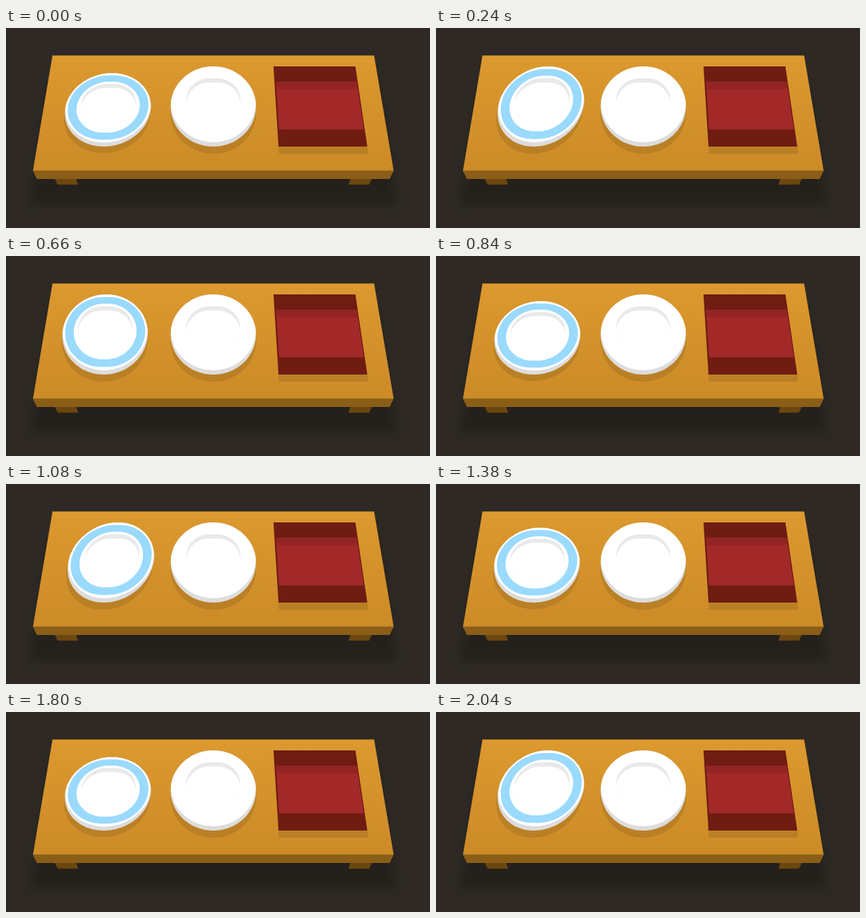
These frames come from a looping animation (640x302 px, 2.1 s). An HTML page with a canvas:

```html
<!DOCTYPE html>
<html lang="en">
<head>
<meta charset="utf-8">
<title>Swaying plate</title>
<style>
  html, body { margin: 0; width: 100%; height: 100%; overflow: hidden; background: #2e2924; }
  canvas { display: block; width: 640px; height: 302px; }
</style>
</head>
<body>
<canvas id="stage" width="640" height="302"></canvas>
<script>
const ctx = document.getElementById('stage').getContext('2d');

const STEP = 60, STEPS = 35, CYCLE = 15;
const CENTER = { x: 312.9, y: 118 }, DEPTH = 1507, TILT = 0.94;
const TABLE = { half: 255.7, back: -85.7, front: 97.4 };
const BASE = 62.4;      // front edge of the dishes on the table plane
const GAP = 159;        // distance between dishes
const RADIUS = 64.4;
const DROP = 10.5;      // shadow length
const SHADE = 'rgba(0,0,0,0.1)';
const STILL = { lean: 0, height: 1 };

// Lean left and right, flattening whenever the plate passes upright.
function swayAt(step) {
  const swing = Math.sin(2 * Math.PI * (step + 0.5) / CYCLE);
  const reach = Math.min(1, 1.25 * Math.abs(swing) ** 1.6);
  return { lean: 0.07 * Math.sign(swing) * reach, height: 0.9 + 0.1 * reach };
}

// table plane to screen
function project(u, v) {
  const w = v * TILT;
  const s = 1 / (1 - w / DEPTH);
  return [CENTER.x + u * s, CENTER.y + w * s];
}

function polygon(points) {
  const path = new Path2D();
  points.forEach(([x, y]) => path.lineTo(x, y));
  path.closePath();
  return path;
}

function box(left, right, back, front) {
  return polygon([
    project(left, back), project(right, back), project(right, front), project(left, front)
  ]);
}

// Circle of radius r, widened by a straight part of half length flat.
function disc(x, v, r, pose, flat = 0) {
  const points = [];
  for (let i = 0; i < 120; i++) {
    const a = (i + 0.5) * Math.PI / 60;
    const side = r * Math.cos(a) + flat * Math.sign(Math.cos(a));
    const rise = (BASE - v - r * Math.sin(a)) * pose.height;
    points.push(project(x + side + rise * pose.lean, BASE - rise));
  }
  return polygon(points);
}

function fill(color, path) {
  ctx.fillStyle = color;
  ctx.fill(path);
}

function clipped(color, path, mask) {
  ctx.save();
  ctx.clip(mask);
  fill(color, path);
  ctx.restore();
}

function plate(x, pose, ring) {
  const v = BASE - RADIUS;
  const body = disc(x, v, RADIUS, pose);
  fill(SHADE, disc(x, v + DROP, RADIUS, pose));
  fill('#dcdcdc', body);
  clipped('#fff', disc(x, v - 6.5, RADIUS, pose), body);
  if (ring) {
    fill('#9adafd', disc(x, -5.5, 56.5, pose, 4));
    fill('#fff', disc(x, -5.5, 45, pose, 2.5));
  }
  const well = disc(x, -11, 35, pose, 6);
  fill('#e9e9e9', well);
  clipped('#fff', disc(x, -4, 35, pose, 6), well);
}

function leg(mirror) {
  const corner = (dx, y) => [CENTER.x + mirror * dx, y];
  fill('#6c470f', polygon([corner(239, 228), corner(207, 228), corner(204, 236.6), corner(235, 236.6)]));
}

function table() {
  const { half, back, front } = TABLE;
  ctx.fillStyle = '#2e2924';
  ctx.fillRect(0, 0, 640, 302);
  ctx.filter = 'blur(7px)';
  fill('rgba(0,0,0,0.2)', box(-half + 3, half - 3, back + 53, front + 47));
  ctx.filter = 'none';

  leg(-1);
  leg(1);
  const [left, edge] = project(-half, front);
  const [right] = project(half, front);
  fill('#8b5e18', polygon([
    [left, edge], [right, edge], [right - 6, edge + 12.5], [left + 6, edge + 12.5]
  ]));
  const wood = ctx.createLinearGradient(0, 41, 0, edge);
  wood.addColorStop(0, '#dc992f');
  wood.addColorStop(1, '#cc8b27');
  fill(wood, box(-half, half, back, front));
}

function tray() {
  const left = GAP - RADIUS, right = GAP + RADIUS;
  fill(SHADE, box(left, right, BASE, BASE + DROP));
  fill('#6f1c13', box(left, right, BASE - 2 * RADIUS, BASE));
  fill('#a32929', box(left + 2.4, right - 1.4, -40.4, 36.4));
  fill('#932424', box(left + 2.4, right - 1.4, -40.4, -28.1));
}

function draw(time) {
  const step = Math.floor(time / STEP) % STEPS;
  table();
  plate(-GAP, swayAt(step), true);
  plate(0, STILL, false);
  tray();
}

function tick() {
  draw(performance.now());
  requestAnimationFrame(tick);
}

draw(0);
requestAnimationFrame(tick);
</script>
</body>
</html>
```
